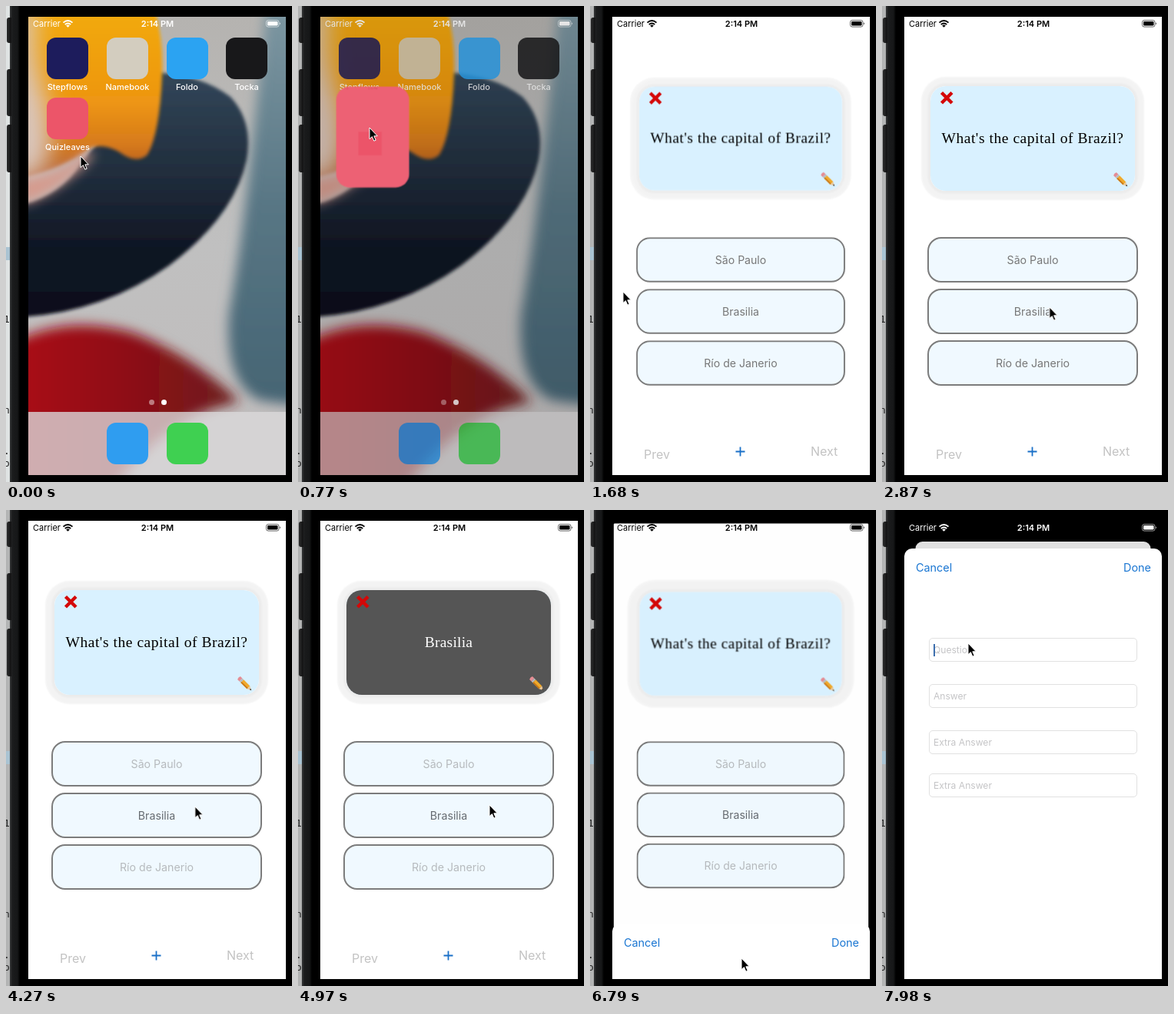
Recreate the animation shown at these times as an HTML page. Size 372 px wide and 618 px high, loop 8000 ms.

```html
<!DOCTYPE html>
<html lang="en">
<head>
<meta charset="utf-8">
<title>Quiz card demo</title>
<style>
@property --open { syntax: "<number>"; inherits: true; initial-value: 0; }
@property --drop { syntax: "<number>"; inherits: true; initial-value: 0; }
@property --lift { syntax: "<number>"; inherits: true; initial-value: 0; }

html, body { margin: 0; width: 100%; height: 100%; overflow: hidden; background: #000; }
* { box-sizing: border-box; }
div, span, svg { position: absolute; }
#stage { left: 0; top: 0; width: 372px; height: 618px; overflow: hidden; background: #000; font-family: Inter, Roboto, sans-serif; }
.loop, .loop * { animation-duration: 8s; animation-iteration-count: infinite; animation-timing-function: linear; }

/* Desktop and phone body */
.desk { left: 0; top: 0; width: 6px; height: 618px; overflow: hidden; font: 13px "DejaVu Sans Mono", monospace; color: #222; animation-name: desk; }
.desk span { left: -3px; line-height: 16px; }
.desk .tint { left: 0; top: 313px; width: 6px; height: 17px; background: #a9c3d2; }
.bezel { left: 5px; top: 0; width: 13px; height: 618px; background: linear-gradient(90deg, #3a3c3d, #1b1c1d 3px, #161718 10px, #000); }
.key { left: 1px; width: 6px; border-radius: 3px 0 0 3px; background: linear-gradient(90deg, #2d2d2e, #111); }
@keyframes desk { 0%, 4% { background: #dfe3e3; } 8%, 100% { background: #b3b4b4; } }

.screen { left: 29px; top: 14px; width: 335px; height: 595px; overflow: hidden; background: #000; animation-name: open, lift; }
@keyframes open {
  0%, 9.3% { --open: 0; --drop: 0; animation-timing-function: cubic-bezier(.25,.3,.5,.95); }
  12.25% { --open: .936; --drop: .88; animation-timing-function: cubic-bezier(.1,.6,.4,1); }
  16.5%, 100% { --open: 1; --drop: 1; }
}
@keyframes lift {
  0%, 84.2% { --lift: 0; }
  84.9% { --lift: .131; }
  85.9% { --lift: .46; }
  86.9% { --lift: .72; }
  88.1% { --lift: .886; }
  89.4% { --lift: .957; }
  91.2% { --lift: .99; }
  93.6%, 100% { --lift: 1; }
}

/* Status bar */
.status { left: 0; top: 0; width: 335px; height: 19px; font-size: 11px; line-height: 19px; }
.status b { position: absolute; left: 0; width: 336px; text-align: center; font-weight: 600; }
.status span { left: 6px; }
.status svg { left: 0; top: 0; }
.app .status { animation-name: ink; }
@keyframes ink { 0%, 85% { color: #000; } 88%, 100% { color: #fff; } }

/* Home screen */
.home { inset: 0; color: #fff; }
.icons { inset: 0; opacity: calc(1 - var(--open)); }
.dock { left: 0; top: 513px; width: 335px; height: 82px; background: rgba(220,218,219,.78); }
.tile { width: 54px; height: 54px; border-radius: 12px; }
.tile span { top: 57px; left: -23px; width: 100px; text-align: center; font-size: 11px; font-weight: 500; line-height: 15px; }
.dot { top: 497px; width: 7px; height: 7px; border-radius: 50%; background: #fff; }
.dim { inset: 0; background: #000; opacity: calc(.7 * var(--open)); }

/* App window, growing out of its tile */
.app {
  --s: calc(.161 + .839 * var(--open));
  left: 0; top: 0; width: 335px; height: 595px; background: #000; transform-origin: 0 0;
  transform: translate(calc(24px * (1 - var(--open))), calc(105px * (1 - var(--drop)))) scale(var(--s));
  clip-path: inset(0 0 calc(595px - (54px + 270.5px * (var(--open) + var(--drop))) / var(--s)) 0 round calc(74px * (1 - var(--open))));
  animation-name: appear;
}
@keyframes appear { 0%, 9.2% { opacity: 0; } 9.4%, 100% { opacity: 1; } }
.cover { inset: 0; background: #ec5569; animation-name: uncover; }
@keyframes uncover { 0%, 9.5% { opacity: 1; } 11.3%, 100% { opacity: 0; } }
.main {
  inset: 0; background: #fff; overflow: hidden; transform-origin: 50% 0;
  border-radius: calc(10px * var(--lift));
  transform: translateY(calc(27px * var(--lift))) scale(calc(1 - .0866 * var(--lift)));
}
.shade { inset: 0; background: #000; opacity: calc(.12 * var(--lift) * var(--lift)); }
.mark { left: 102px; top: 207px; width: 107px; height: 107px; background: #ec5569; animation-name: unmark; }
@keyframes unmark { 0%, 10.6% { opacity: 1; } 12.25% { opacity: .36; } 13.2%, 100% { opacity: 0; } }
.nav { inset: 0; font-size: 16px; line-height: 20px; color: #c3c3c3; animation-name: nav; }
@keyframes nav { 0%, 10.6% { opacity: 0; } 12.25% { opacity: .7; } 13.2%, 100% { opacity: 1; } }

.pop { animation-name: pop; }
@keyframes pop {
  0%, 14% { opacity: 0; transform: scale(.75); animation-timing-function: ease-out; }
  17.5% { opacity: 1; transform: scale(.972); }
  21% { opacity: 1; transform: scale(.992); }
  24.5%, 100% { opacity: 1; transform: none; }
}
.card { left: 34px; top: 90px; width: 266px; height: 136px; }
.face { inset: 0; border-radius: 20px; background: #d9f1ff; text-align: center; line-height: 135px; font-family: "Liberation Serif", "Noto Serif", serif; font-size: 19.5px; letter-spacing: .55px; color: #000; white-space: nowrap; }
.flip {
  inset: 0; border-radius: 20px; animation-name: flip;
  box-shadow: 0 0 3px 4px rgba(0,0,0,.035), 0 0 2px calc(12px + 4px * min(1, 8 * var(--lift))) rgba(0,0,0,.047);
}
@keyframes flip {
  0%, 56.8%, 62.1%, 70.8%, 75.6%, 100% { transform: perspective(900px) rotateY(0deg); }
  59.4%, 73.2% { transform: perspective(900px) rotateY(-90deg); }
  59.41%, 73.21% { transform: perspective(900px) rotateY(90deg); }
}
.back { background: #555; color: #fff; letter-spacing: .2px; animation-name: back; }
.loop .back { animation-timing-function: step-end; }
@keyframes back { 0% { opacity: 0; } 59.4% { opacity: 1; } 73.2%, 100% { opacity: 0; } }

.answer { left: 30px; width: 274px; height: 59px; border: 2px solid #7c7c7c; border-radius: 18px; background: #f0f9ff; }
.answer span { inset: 0; text-align: center; line-height: 55px; font-size: 14.2px; color: #777; animation-name: wrong; }
.answer .right { animation-name: right; }
@keyframes wrong { 0%, 41.1% { color: #777; } 45.5%, 100% { color: #b6babd; } }
@keyframes right { 0%, 41.1% { color: #777; } 45.5%, 100% { color: #666b70; } }

/* Form sheet */
.sheet { left: 0; top: 36px; width: 335px; height: 559px; border-radius: 10px 10px 0 0; background: #fff; transform: translateY(calc(559px * (1 - var(--lift)))); }
.link { top: 15px; line-height: 20px; font-size: 14.4px; color: #1a76d2; }
.field { left: 32px; width: 271px; height: 31px; border: 1px solid #e1e1e1; border-radius: 5px; padding-left: 5px; font-size: 12.1px; line-height: 29px; color: #c4c4c6; }
.caret { left: 38px; top: 124px; width: 2px; height: 16px; background: #3d6fae; animation-name: caret; }
.loop .caret { animation-timing-function: step-end; }
@keyframes caret { 0% { opacity: 0; } 99.7%, 100% { opacity: 1; } }

.pointer { left: 0; top: 0; overflow: visible; animation-name: pointer; }
@keyframes pointer {
  0%, .9% { transform: translate(97px, 195px); }
  2.6%, 16.5% { transform: translate(93px, 158px); }
  19.2%, 28% { transform: translate(43px, 371px); }
  35.9%, 51.6% { transform: translate(218px, 391px); }
  53.4% { transform: translate(246px, 385px); }
  55.1%, 73% { transform: translate(249px, 383px); }
  80.5%, 86% { transform: translate(197px, 582px); }
  93.6% { transform: translate(106px, 183px); }
  96.2%, 100% { transform: translate(112px, 173px); }
}
</style>
</head>
<body>
<svg width="0" height="0">
  <symbol id="signals" viewBox="0 0 335 19">
    <g fill="none" stroke="currentColor" stroke-width="1.9">
      <path d="M45.5 7.6Q51.5 2.4 57.5 7.6M47.8 10.1Q51.5 7 55.2 10.1"/>
      <rect x="309.5" y="4.5" width="16.5" height="8.6" rx="2.6" stroke-width="1" opacity=".6"/>
    </g>
    <path d="M49.2 11.4Q51.5 9.6 53.8 11.4L51.5 13.8Z" fill="currentColor"/>
    <rect x="311" y="6" width="13.5" height="5.6" rx="1.4" fill="currentColor"/>
    <path d="M327 7.2q1.6 1.6 0 3.2z" fill="currentColor"/>
  </symbol>
</svg>

<div id="stage" class="loop">
  <div class="desk">
    <div class="tint"></div>
    <span style="top:399px">1.</span>
    <span style="top:517px">n(</span>
    <span style="top:570px">.</span>
    <span style="top:586px">oi</span>
  </div>
  <div class="bezel"></div>
  <div class="key" style="top:15px;height:33px"></div>
  <div class="key" style="top:82px;height:61px"></div>
  <div class="key" style="top:154px;height:62px"></div>

  <div class="screen">
    <div class="home">
      <svg width="335" height="595" viewBox="29 14 335 595">
        <defs>
          <linearGradient id="sky" x2="0" y2="1"><stop stop-color="#b5b3b0"/><stop offset=".5" stop-color="#c0c0c0"/><stop offset="1" stop-color="#c0bcbc"/></linearGradient>
          <linearGradient id="navy" x2="0" y2="1"><stop stop-color="#33475a"/><stop offset=".45" stop-color="#1f2b3a"/><stop offset=".75" stop-color="#0e1422"/><stop offset="1" stop-color="#0c101e"/></linearGradient>
          <linearGradient id="amber" x2="0" y2="1"><stop stop-color="#f2ab0c"/><stop offset=".55" stop-color="#ee9612"/><stop offset=".8" stop-color="#d67a1c"/><stop offset="1" stop-color="#a9521f"/></linearGradient>
          <linearGradient id="teal" x2="0" y2="1"><stop stop-color="#7d97a2"/><stop offset=".5" stop-color="#587684"/><stop offset="1" stop-color="#456473"/></linearGradient>
          <linearGradient id="red"><stop stop-color="#ab0d16"/><stop offset=".5" stop-color="#8e0c13"/><stop offset="1" stop-color="#6b1f20"/></linearGradient>
          <filter id="soft" x="-30%" y="-30%" width="160%" height="160%"><feGaussianBlur stdDeviation="8"/></filter>
          <filter id="haze" x="-60%" y="-60%" width="220%" height="220%"><feGaussianBlur stdDeviation="16"/></filter>
          <filter id="edge"><feGaussianBlur stdDeviation="2"/></filter>
        </defs>
        <path fill="url(#sky)" d="M29 14h335v595H29z"/>
        <path fill="url(#teal)" filter="url(#soft)" d="M338 0Q330 90 318 200T290 400Q284 490 330 512L390 520V0z"/>
        <path fill="url(#navy)" filter="url(#edge)" d="M20 258Q70 246 98 204Q120 172 150 150L180 86Q250 86 292 118Q322 150 313 200Q297 273 212 337Q128 397 20 404z"/>
        <path fill="url(#amber)" filter="url(#edge)" d="M10 0H192Q205 40 203 90Q200 165 184 193Q170 206 148 190Q128 178 110 184Q70 215 10 225z"/>
        <path fill="#d9c8c0" filter="url(#haze)" d="M0 0H40Q30 60 48 110Q66 170 50 215L0 240z"/>
        <path fill="#d69a8c" filter="url(#soft)" d="M20 225Q70 220 106 186L114 194Q72 240 20 258z"/>
        <path fill="url(#red)" filter="url(#soft)" d="M10 436Q80 400 165 424Q245 455 304 514Q210 530 140 625H10z"/>
      </svg>
      <div class="icons">
        <div class="dock"></div>
        <div class="tile" style="left:24px;top:27px;background:#1d1c5c"><span>Stepflows</span></div>
        <div class="tile" style="left:102px;top:27px;background:#d3cdbf"><span>Namebook</span></div>
        <div class="tile" style="left:179.5px;top:27px;background:#2ba3f2"><span>Foldo</span></div>
        <div class="tile" style="left:257px;top:27px;background:#18181a"><span>Tocka</span></div>
        <div class="tile" style="left:24px;top:105px;background:#ec5569"><span>Quizleaves</span></div>
        <div class="tile" style="left:102px;top:527px;background:#2f9df0"></div>
        <div class="tile" style="left:179.5px;top:527px;background:#3fd051"></div>
        <div class="dot" style="left:156.5px;opacity:.45"></div>
        <div class="dot" style="left:172.5px"></div>
      </div>
      <div class="status"><span>Carrier</span><svg width="335" height="19"><use href="#signals"/></svg><b>2:14 PM</b></div>
    </div>
    <div class="dim"></div>

    <div class="app">
      <div class="main">
        <div class="mark"></div>
        <div class="nav">
          <span style="left:41px;top:558px">Prev</span>
          <span style="left:258px;top:554px">Next</span>
          <svg style="left:160px;top:558px" width="13" height="13"><path d="M6.5 .5v12M.5 6.5h12" stroke="#1a70c8" stroke-width="1.8"/></svg>
        </div>
        <div class="card pop">
          <div class="flip">
            <div class="face">What's the capital of Brazil?</div>
            <div class="face back">Brasilia</div>
            <svg width="266" height="136">
              <path d="M14.5 8.5l13.5 13.5M28 8.5L14.5 22" stroke="#d40808" stroke-width="4.4"/>
              <g transform="translate(240 114) rotate(45)">
                <path fill="#e58d95" d="M0-2.7h3.5v5.4H0q-1.5-2.7 0-5.4z"/>
                <path fill="#b9bcc0" d="M3.5-2.7h2.5v5.4H3.5z"/>
                <path fill="#f0aa2c" d="M6-2.7h11.5v5.4H6z"/>
                <path fill="#c97718" d="M6 1h11.5v1.7H6z"/>
                <path fill="#e9c79a" d="M17.5-2.7L22.5 0l-5 2.7z"/>
                <path fill="#333" d="M20.6-1L23 0l-2.4 1z"/>
              </g>
            </svg>
          </div>
        </div>
        <div class="answer pop" style="top:286px"><span>São Paulo</span></div>
        <div class="answer pop" style="top:353px"><span class="right">Brasilia</span></div>
        <div class="answer pop" style="top:420px"><span>Río de Janerio</span></div>
        <div class="shade"></div>
      </div>
      <div class="sheet">
        <span class="link" style="left:15px">Cancel</span>
        <span class="link" style="right:14px">Done</span>
        <div class="field" style="top:116px">Question</div>
        <div class="field" style="top:176px">Answer</div>
        <div class="field" style="top:236px">Extra Answer</div>
        <div class="field" style="top:292px">Extra Answer</div>
        <div class="caret"></div>
      </div>
      <div class="status"><span>Carrier</span><svg width="335" height="19"><use href="#signals"/></svg><b>2:14 PM</b></div>
      <div class="cover"></div>
    </div>
  </div>

  <svg class="pointer" width="12" height="20"><path d="M0 0V14.6L3.4 11.6L5.8 17.2L8.2 16.2L5.8 10.8H10.3Z" stroke="#fff" stroke-width="1"/></svg>
</div>
</body>
</html>
```
